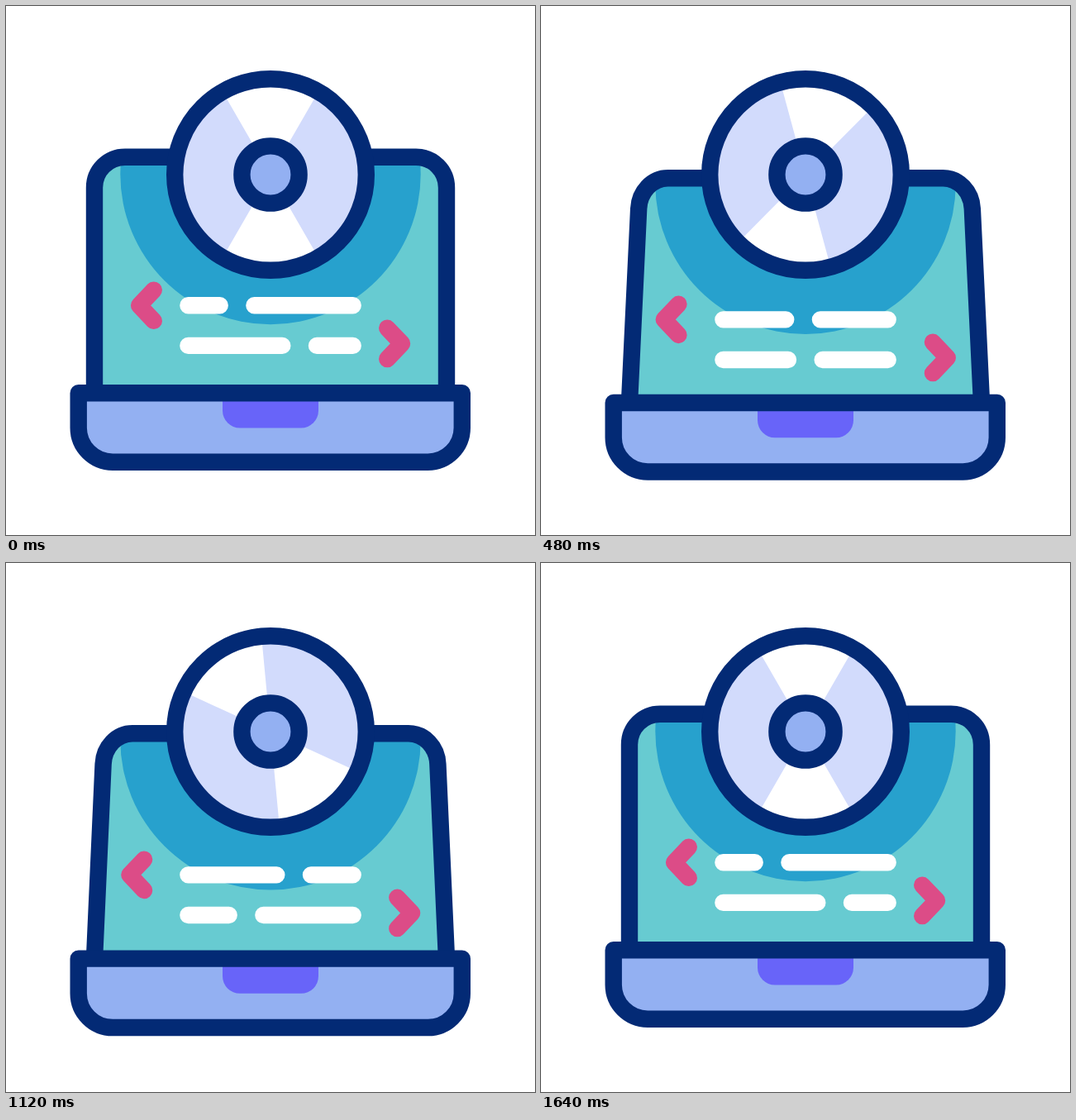
An HTML page for the animation above (1680 ms loop, 640x640 px).

```html
<!DOCTYPE html>
<html lang="en">
<head>
<meta charset="utf-8">
<title>Laptop and disc</title>
<style>
  html, body { margin: 0; width: 100%; height: 100%; overflow: hidden; background: #fff; }
  svg { display: block; width: 100%; height: 100%; fill: none; stroke-width: 20.4; stroke-linecap: round; stroke-linejoin: round; }
  .navy { stroke: #032a75; }
  .pink { stroke: #dc4c87; }
  .white { stroke: #fff; }
</style>
</head>
<body>
<svg viewBox="0 0 640 640">
  <clipPath id="clip"><path id="clipShape"/></clipPath>
  <g clip-path="url(#clip)">
    <rect width="640" height="640" fill="#67cbd1"/>
    <circle id="glow" cx="320" cy="203.5" r="181.7" fill="#27a1cd"/>
  </g>
  <path id="screen" class="navy"/>
  <path id="code" class="white"/>
  <path id="left" class="pink" d="M178.8 343.6L161.1 362.2L178.8 380.9"/>
  <path id="right" class="pink" d="M461.2 389.7L479 408.4L461.2 427.1"/>
  <g id="base">
    <path fill="#93b0f2" d="M87.7 468.3H551.8V510.3A41.4 41.4 0 0 1 510.4 551.7H129.1A41.4 41.4 0 0 1 87.7 510.3Z"/>
    <path fill="#6864f9" d="M262 470H378V489.5A21 21 0 0 1 357 510.5H283A21 21 0 0 1 262 489.5Z"/>
    <path class="navy" d="M87.7 468.3H551.8V510.3A41.4 41.4 0 0 1 510.4 551.7H129.1A41.4 41.4 0 0 1 87.7 510.3Z"/>
  </g>
  <circle cx="320" cy="204" r="115.8" fill="#d2dbfc"/>
  <path id="shine" fill="#fff" d="M320 204L264 107A112 112 0 0 1 376 107L264 301A112 112 0 0 0 376 301Z"/>
  <circle class="navy" cx="320" cy="204" r="115.8"/>
  <circle class="navy" cx="320" cy="204" r="34.6" fill="#93b0f2"/>
</svg>
<script>
  const LOOP = 1680;
  const el = id => document.getElementById(id);

  // Same curve as cubic-bezier(.55, 0, .45, 1), solved by bisection
  function ease(x) {
    if (x <= 0) return 0;
    if (x >= 1) return 1;
    let lo = 0, hi = 1;
    for (let i = 0; i < 24; i++) {
      const s = (lo + hi) / 2;
      if (1.65 * s - 1.95 * s * s + 1.3 * s ** 3 < x) lo = s; else hi = s;
    }
    return lo * lo * (3 - 2 * lo);
  }
  const ramp = (t, from, to) => ease((t - from) / (to - from));
  const swing = (t, start, peak, end) => ramp(t, start, peak) - ramp(t, peak, end);
  const move = (id, x, y) => el(id).setAttribute('transform', `translate(${x} ${y})`);

  function screenPath(drop, tilt) {
    const bottom = 468.3 + 16.3 * drop;
    const top = 182.7 + 16.3 * drop + 20.2 * tilt;
    const side = 107 + 16.3 * tilt;
    const bend = side + 1.3 * tilt;
    const pull = 123.5 + 16 * tilt;
    const flat = 144 + 14 * tilt;
    const mirror = x => 640 - x;
    return `M107 ${bottom}L${side} ${top + 37}C${bend} ${top + 16.5} ${pull} ${top} ${flat} ${top}` +
      `H${mirror(flat)}C${mirror(pull)} ${top} ${mirror(bend)} ${top + 16.5} ${mirror(side)} ${top + 37}` +
      `L533 ${bottom}`;
  }

  const codeLine = (y, gap) => `M220.4 ${y}H${gap}M${gap + 41.7} ${y}H419.7`;

  function draw(t) {
    const drop = swing(t, 20, 780, 1560);
    const tilt = swing(t, 40, 790, 1560);
    const type = swing(t, 120, 880, 1600);
    const textDrop = 23.7 * drop;

    const outline = screenPath(drop, tilt);
    el('screen').setAttribute('d', outline);
    el('clipShape').setAttribute('d', outline + 'Z');
    el('code').setAttribute('d',
      codeLine(362.3 + textDrop, 258.7 + 84.4 * type) +
      codeLine(410.9 + textDrop, 334.3 - 79.5 * type));
    move('glow', 0, 16.3 * drop);
    move('base', 0, 16.3 * drop);
    move('left', -18 * tilt, textDrop);
    move('right', 18.6 * tilt, textDrop);
    el('shine').setAttribute('transform', `rotate(${180 * ramp(t, 120, 1640)} 320 204)`);
  }

  const start = performance.now();
  function tick() {
    draw((performance.now() - start) % LOOP);
    requestAnimationFrame(tick);
  }
  tick();
</script>
</body>
</html>
```
